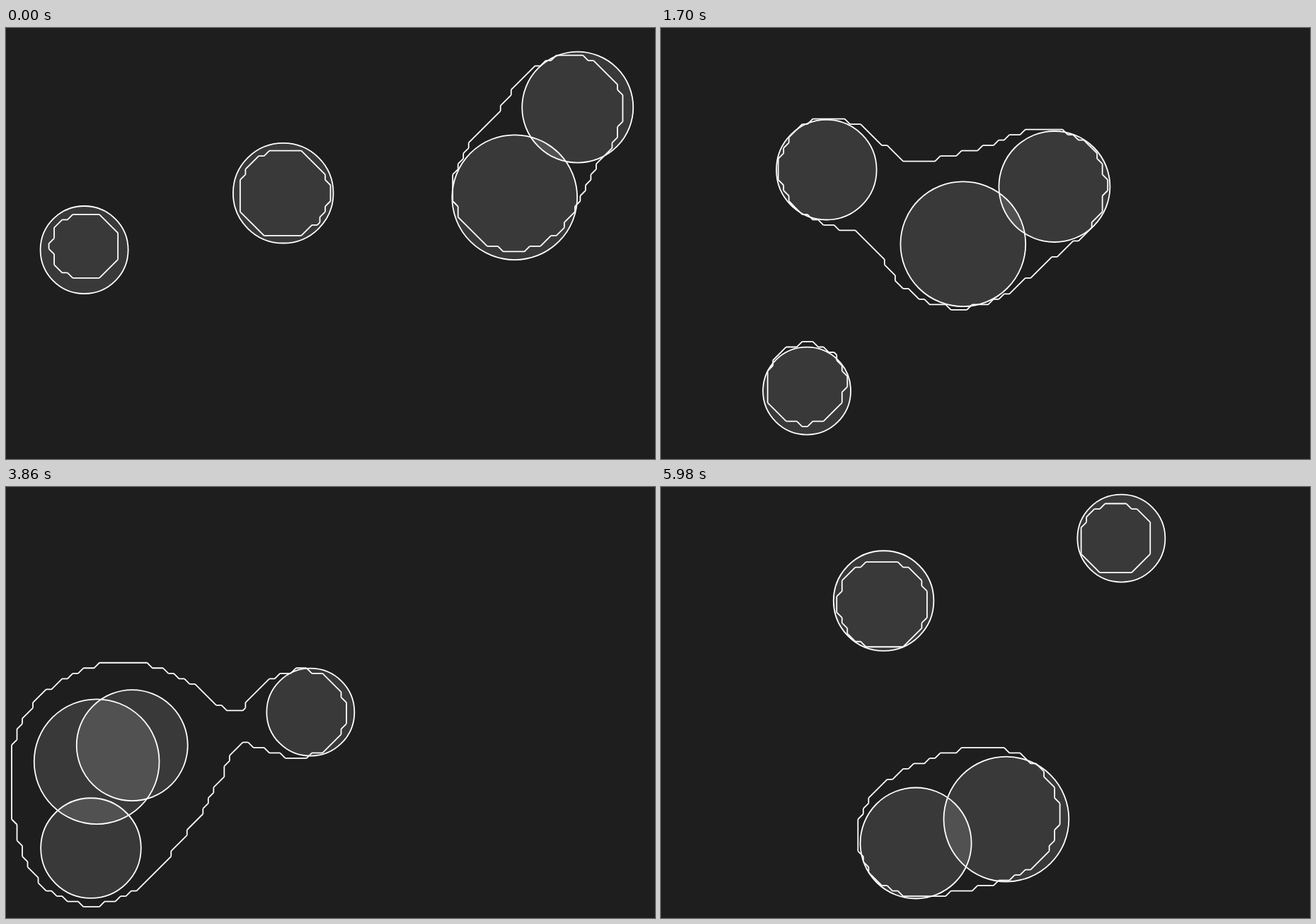
These frames come from a looping animation (917x610 px, 6000 ms). An HTML page:

```html
<!DOCTYPE html>
<html lang="en">
<head>
<meta charset="utf-8">
<title>Metaballs on a grid</title>
<style>
  html, body { margin: 0; width: 100%; height: 100%; overflow: hidden; background: #1e1e1e; }
  svg { display: block; width: 917px; height: 610px; }
  circle { fill: rgba(255, 255, 255, .12); }
  circle, path { stroke: #fff; stroke-width: 1.8; }
  path { fill: none; }
</style>
</head>
<body>
<svg viewBox="0 0 917 610"></svg>
<script>
const LOOP = 6000, TICK = 20;
const CELL = 7.508, COLS = 123, ROWS = 82, THRESHOLD = 1.797;

// Each axis: start, speed per step, steps at which the ball turns back
const balls = [
  { r: 88.4, x: [718.7, -3.394, [184]], y: [239.7, 0.768, []] },
  { r: 78.5, x: [807.7, 3.497, [7, 221]], y: [112.2, 1.306, []] },
  { r: 70.8, x: [391.7, -1.836, [171]], y: [233.7, -3.302, [48, 187]] },
  { r: 62, x: [110.6, -2.076, [20]], y: [314, 2.321, [98]] }
];

const svg = document.querySelector('svg');
const add = (tag) => svg.appendChild(document.createElementNS('http://www.w3.org/2000/svg', tag));
for (const ball of balls) {
  ball.node = add('circle');
  ball.node.setAttribute('r', ball.r);
}
const outline = add('path');

function position([start, speed, turns], step) {
  let pos = start, from = 0, v = speed;
  for (const turn of turns) {
    if (step <= turn) break;
    pos += v * (turn - from);
    from = turn;
    v = -v;
  }
  return pos + v * (step - from);
}

const place = (step) => balls.map(({ r, x, y }) => ({ r, x: position(x, step), y: position(y, step) }));

function isInside(discs, x, y) {
  let sum = 0;
  for (const d of discs) sum += d.r / Math.hypot(x - d.x, y - d.y);
  return sum > THRESHOLD;
}

// Marching squares without interpolation, drawn half a cell up and left
function contour(discs) {
  const grid = [];
  for (let j = 0; j <= ROWS; j++) {
    grid.push([]);
    for (let i = 0; i <= COLS; i++) grid[j].push(isInside(discs, i * CELL, j * CELL));
  }
  const point = (i, j) => ((i - .5) * CELL + .5).toFixed(2) + ' ' + ((j - .5) * CELL + 1).toFixed(2);
  let path = '';
  for (let j = 0; j < ROWS; j++) {
    for (let i = 0; i < COLS; i++) {
      const a = grid[j][i], b = grid[j][i + 1], c = grid[j + 1][i + 1], d = grid[j + 1][i];
      const cuts = [];
      if (a !== b) cuts.push(point(i + .5, j));
      if (b !== c) cuts.push(point(i + 1, j + .5));
      if (c !== d) cuts.push(point(i + .5, j + 1));
      if (d !== a) cuts.push(point(i, j + .5));
      for (let n = 0; n < cuts.length; n += 2) path += `M${cuts[n]}L${cuts[n + 1]}`;
    }
  }
  return path;
}

let shown = -1;
function render(time) {
  const tick = Math.floor((time % LOOP) / TICK);
  if (tick === shown) return;
  shown = tick;
  const step = tick ? tick + 1 : 0;
  place(step).forEach(({ x, y }, n) => {
    balls[n].node.setAttribute('cx', x);
    balls[n].node.setAttribute('cy', y);
  });
  // The outline trails the discs by one step
  outline.setAttribute('d', contour(place(step - 1)));
}

let origin;
function loop(now) {
  origin ??= now;
  render(now - origin);
  requestAnimationFrame(loop);
}
render(0);
requestAnimationFrame(loop);
</script>
</body>
</html>
```
